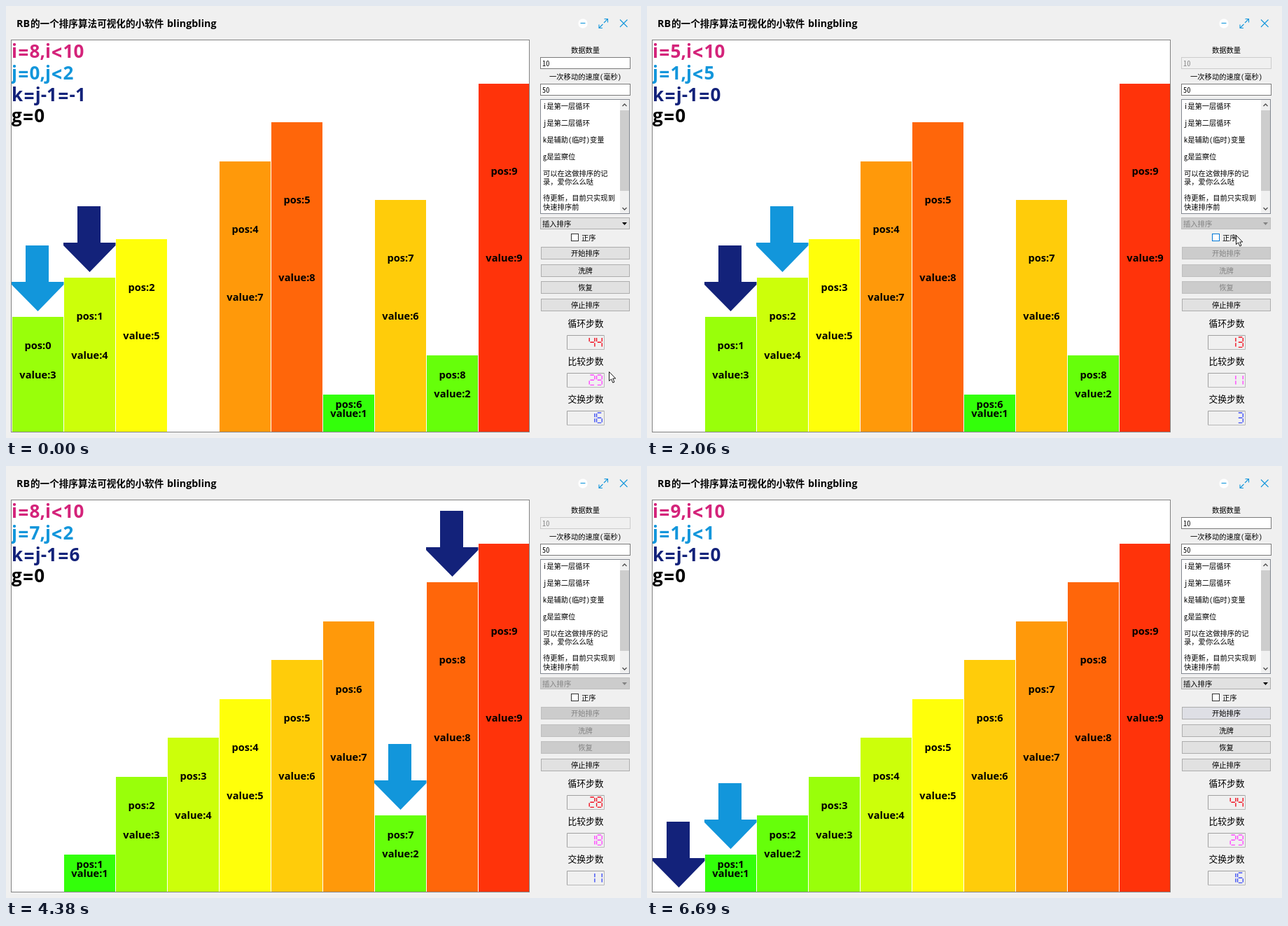
These frames come from a looping animation (907x617 px, 6.84 s). An HTML page:

```html
<!DOCTYPE html>
<html lang="zh">
<head>
<meta charset="utf-8">
<title>排序算法可视化</title>
<style>
html, body { margin: 0; width: 100%; height: 100%; overflow: hidden; background: #f0f0f0; }
svg { display: block; width: 100vw; height: 100vh; }
text { white-space: pre; }
.latin { font: 700 14.6px "Open Sans", "Noto Sans", sans-serif; }
.brand { font: 700 14.3px "Open Sans", "Noto Sans", sans-serif; }
.title { font: 700 13.6px "Noto Sans CJK SC", "Noto Sans CJK", sans-serif; }
.vars { font: 700 26px "Open Sans", "Noto Sans", sans-serif; }
.op { font-family: Inter, sans-serif; }
.ui { font: 10.3px "Noto Sans Mono CJK SC", "Noto Sans CJK SC", "Noto Sans CJK", monospace; }
.head { font: 12.8px "Noto Sans CJK SC", "Noto Sans CJK", sans-serif; }
.mid { text-anchor: middle; }
.edit rect { fill: #fff; stroke: #7a7a7a; }
.button rect { fill: #e1e1e1; stroke: #adadad; }
.focus #start rect { fill: #dedfe5; }
.off .lock text, .off .lock path { fill: #838383; }
.off .lock.button rect { fill: #ccc; stroke: #bfbfbf; }
.off .lock.edit rect { fill: #f0f0f0; stroke: #ccc; }
.line { fill: none; stroke: #1296db; stroke-width: 1.1; }
</style>
</head>
<body>
<svg id="stage" viewBox="0 0 907 617" preserveAspectRatio="none"></svg>
<script>
const LOOP = 6840, RATE = 13 / 1000, LAST_TICK = 85;
const START = 371, END = 6470;
const SWAP = 190, KEEP = 103, WAIT = 50, TRAVEL = 95;
const FIRST = [3, 4, 5, 0, 7, 8, 1, 6, 2, 9];
// [step number, ms at which it begins]
const PACE = [[0, START], [3, 680], [14, 2045], [17, 2538], [22, 3435], [32, 4898],
  [36, 5505], [43, 6225], [44, 6340], [45, END]];
// [ms, x, y] of the pointer tip
const POINTER = [[0, 861, 522], [40, 861, 522], [330, 847, 348], [900, 847, 348], [1250, 841, 327],
  [3680, 841, 327], [4020, 912, 300]];
const SEGMENTS = {
  a: "M1.5 0H7", b: "M8 1V6.2", c: "M8 8.2V13.4", d: "M1.5 14.4H7",
  e: "M.3 8.2V13.4", f: "M.3 1V6.2", g: "M1.5 7.2H7"
};
const DIGITS = ["abcdef", "bc", "abged", "abgcd", "fgbc", "afgcd", "afgecd", "abc", "abcdefg", "abcdfg"];

const stage = document.getElementById("stage");
const get = id => document.getElementById(id);
const clamp = v => Math.max(0, Math.min(1, v));
const columnX = c => 9 + 74 * c;
const topY = v => Math.floor(610.5 - 55.5 * v);

function lerpTable(table, at, from = 0, to = 1) {
  if (at <= table[0][from]) return table[0][to];
  for (let n = 1; n < table.length; n++) {
    const a = table[n - 1], b = table[n];
    if (at < b[from]) return a[to] + (b[to] - a[to]) * (at - a[from]) / (b[from] - a[from]);
  }
  return table[table.length - 1][to];
}

// Insertion sort without early exit, recorded step by step
function record() {
  const list = FIRST.slice(), steps = [];
  let arrows = [0, 1], swaps = 0, keeps = 0, begin = 0;
  for (let i = 1; i < 10; i++) {
    for (let j = i; j > 0; j--) {
      const swap = list[j - 1] > list[j];
      steps.push({ i, j, swap, swaps, keeps, begin, arrows, list: list.slice() });
      if (swap) {
        [list[j - 1], list[j]] = [list[j], list[j - 1]];
        swaps++;
      } else keeps++;
      arrows = swap ? [j - 1, j] : [j, j - 1];
      begin += swap ? SWAP : KEEP;
    }
  }
  return { steps, total: begin, end: { list, arrows, swaps, keeps } };
}
const sort = record();
const unitPace = PACE.map(([n, ms]) => [ms, n < sort.steps.length ? sort.steps[n].begin : sort.total]);

const text = (x, y, cls, str, more = "") => `<text x="${x}" y="${y}" class="${cls}" ${more}>${str}</text>`;
const box = (x, y, w, h, more = "") => `<rect x="${x}" y="${y}" width="${w}" height="${h}" ${more}/>`;
const formula = s => s.replace(/[=<]/g, c => `<tspan class="op">${c === "<" ? "&lt;" : c}</tspan>`);
const button = (y, label, cls, id) => `<g class="button ${cls}" id="${id}">` +
  box(764.5, y + .5, 126, 17) + text(827.5, y + 13, "ui mid", label) + "</g>";
const edit = (y, label, cls) => `<g class="edit ${cls}">` +
  box(763.5, y + .5, 128, 16) + text(766, y + 12.5, "ui", label) + "</g>";

function barMarkup(v) {
  const top = topY(v), h = 609 - top;
  const fill = `rgb(${Math.min(255, 51 * v)},${Math.min(255, 510 - 51 * v)},10)`;
  return `<g id="bar${v}">` + (v ? box(0, top, 73, h, `fill="${fill}"`) +
    text(36.5, top + h / 4 + 5, "latin mid", "", `id="pos${v}"`) +
    text(36.5, top + h / 2 + 5, "latin mid", "value:" + v) : "") + "</g>";
}

function build() {
  const arrow = (id, fill) =>
    `<path id="${id}" fill="${fill}" d="M19-102h33v52h21.500v4L36.500-8L-1-46v-4h20z"/>`;
  const notes = [[147, "i是第一层循环"], [171, "j是第二层循环"], [194.5, "k是辅助(临时)变量"],
    [218.5, "g是监察位"], [242.5, "可以在这做排序的记"], [254.5, "录，爱你么么哒"],
    [278, "待更新，目前只实现到"], [290.5, "快速排序前"]];
  const lcd = (y, label, id, color) => text(828, y - 12, "head mid", label) +
    `<path d="M801.500 ${y + 20.500}V${y + .5}H854.500" fill="none" stroke="#a0a0a0"/>` +
    `<path d="M801.500 ${y + 20.500}H854.500V${y + .5}" fill="none" stroke="#b8b8b8"/>` +
    `<g id="${id}" fill="none" stroke="${color}" stroke-width="1.4"></g>`;

  stage.innerHTML = box(0, 0, 907, 617, 'fill="#f0f0f0"') +
    text(15, 30, "brand", "RB") + text(35, 30, "title", "的一个排序算法可视化的小软件") +
    text(230, 30, "brand", "blingbling") +
    '<circle cx="824" cy="25" r="6.700" fill="#fff"/><path class="line" d="M820.500 24.500h7"/>' +
    '<path class="line" d="M854 24l5.500-5.500M854.500 18.500h5v5M852.500 26l-5.500 5.500M847 26.500v5h5"/>' +
    '<path class="line" d="M877 19.500l10.500 10.500M887.500 19.500l-10.500 10.500"/>' +
    box(7.5, 48.5, 740, 560.5, 'fill="#fff"') +
    '<clipPath id="view"><rect x="8" y="49" width="740" height="560"/></clipPath>' +
    '<g clip-path="url(#view)"><g id="bars">' + FIRST.map((_, v) => barMarkup(v)).join("") + "</g>" +
    arrow("navy", "#13227a") + arrow("blue", "#1296db") +
    ["#d4237a", "#1296db", "#13227a", "#000"].map((c, n) =>
      text(8, 74 + 30.8 * n, "vars", n === 3 ? formula("g=0") : "", `id="var${n}" fill="${c}"`)).join("") + "</g>" +
    box(7.5, 48.5, 740, 560, 'fill="none" stroke="#828282"') +
    text(827.5, 67, "ui mid", "数据数量") + edit(73, "10", "lock") +
    text(827.5, 104.5, "ui mid", "一次移动的速度(毫秒)") + edit(111, "50", "") +
    box(763.5, 133.5, 127, 163, 'fill="#fff" stroke="#828790"') +
    notes.map(([y, s]) => text(767, y, "ui", s)).join("") +
    box(877, 134, 13, 162, 'fill="#f0f0f0"') + box(877, 149, 13, 115, 'fill="#cdcdcd"') +
    '<path d="M880.500 143l3-3l3 3M880.500 288l3 3l3-3" fill="none" stroke="#505050" stroke-width="1.300"/>' +
    '<g class="button lock">' + box(763.5, 302.5, 127, 16) + text(766, 314.5, "ui", "插入排序") +
    '<path d="M880 309h7l-3.500 4z"/></g>' +
    box(807.5, 325.5, 10, 10, 'id="check" fill="#fff" stroke="#333"') + text(822, 335, "ui", "正序") +
    button(344, "开始排序", "lock", "start") + button(369, "洗牌", "lock", "shuffle") +
    button(393, "恢复", "lock", "restore") + button(418, "停止排序", "", "stop") +
    lcd(470, "循环步数", "loops", "#f01020") + lcd(524, "比较步数", "compares", "#ff45ff") +
    lcd(578, "交换步数", "swaps", "#4050f5") +
    '<path id="pointer" d="M.5.500V13.500l3-2.700l2.300 5.200l2.200-1l-2.300-5h4z" fill="#fff" stroke="#000" stroke-width=".9"/>';
}

function showNumber(id, y, value) {
  const chars = String(value);
  get(id).innerHTML = [...chars].map((ch, n) => {
    const x = 843.3 - 10.4 * (chars.length - 1 - n);
    const d = [...DIGITS[ch]].map(s => SEGMENTS[s]).join("");
    return `<path transform="translate(${x} ${y})" d="${d}"/>`;
  }).join("");
}

function place(id, column, y) {
  get(id).setAttribute("transform", `translate(${columnX(column)} ${y})`);
}

function pose(t) {
  const idle = {
    i: 8, j: 0, list: FIRST, arrows: [0, 1], shift: 0, moving: -1,
    loops: 44, keeps: 29, swaps: 16
  };
  if (t < START) return idle;
  if (t >= END) return { ...idle, ...sort.end, i: 9, j: 1 };

  const units = lerpTable(unitPace, t);
  let at = sort.steps.length - 1;
  while (at > 0 && sort.steps[at].begin > units) at--;
  const step = sort.steps[at], age = units - step.begin, { j } = step;
  const out = { ...step, shift: 0, moving: -1, loops: Math.max(0, at - 1) };
  if (age < WAIT) return out;
  out.arrows = [j, j - 1];
  if (step.swap) {
    out.list = step.list.slice();
    [out.list[j - 1], out.list[j]] = [step.list[j], step.list[j - 1]];
    out.arrows = [j - 1, j];
    out.shift = 1 - clamp((age - WAIT) / TRAVEL);
    out.moving = j;
  }
  return out;
}

function render(ms) {
  const tick = Math.min(LAST_TICK, Math.floor((ms + 17) * RATE));
  const t = tick / RATE - 10;
  const now = pose(t);
  // A swapped pair slides in from each other's column
  const slid = c => c === now.moving ? c - now.shift : c === now.moving - 1 ? c + now.shift : c;

  now.list.forEach((v, c) => {
    place("bar" + v, slid(c), 0);
    if (v) get("pos" + v).textContent = "pos:" + c;
  });
  if (now.moving > 0) get("bars").append(get("bar" + now.list[now.moving - 1]));
  ["blue", "navy"].forEach((id, n) => {
    const c = now.arrows[n];
    place(id, slid(c), topY(now.list[c]));
  });

  const { i, j } = now;
  [`i=${i},i<10`, `j=${j},j<${10 - i}`, `k=j-1=${j - 1}`].forEach((s, n) => get("var" + n).innerHTML = formula(s));
  showNumber("loops", 473, now.loops);
  showNumber("compares", 527, now.keeps);
  showNumber("swaps", 581, now.swaps);

  stage.classList.toggle("off", t >= START && t < END);
  stage.classList.toggle("focus", ms >= 6690);
  const x = lerpTable(POINTER, t, 0, 1), y = lerpTable(POINTER, t, 0, 2);
  get("pointer").setAttribute("transform", `translate(${x} ${y})`);
  get("check").setAttribute("stroke", x < 846 && y < 340 ? "#0078d7" : "#333");
}

build();
const origin = performance.now();
function frame() {
  render((performance.now() - origin) % LOOP);
  requestAnimationFrame(frame);
}
frame();
</script>
</body>
</html>
```
